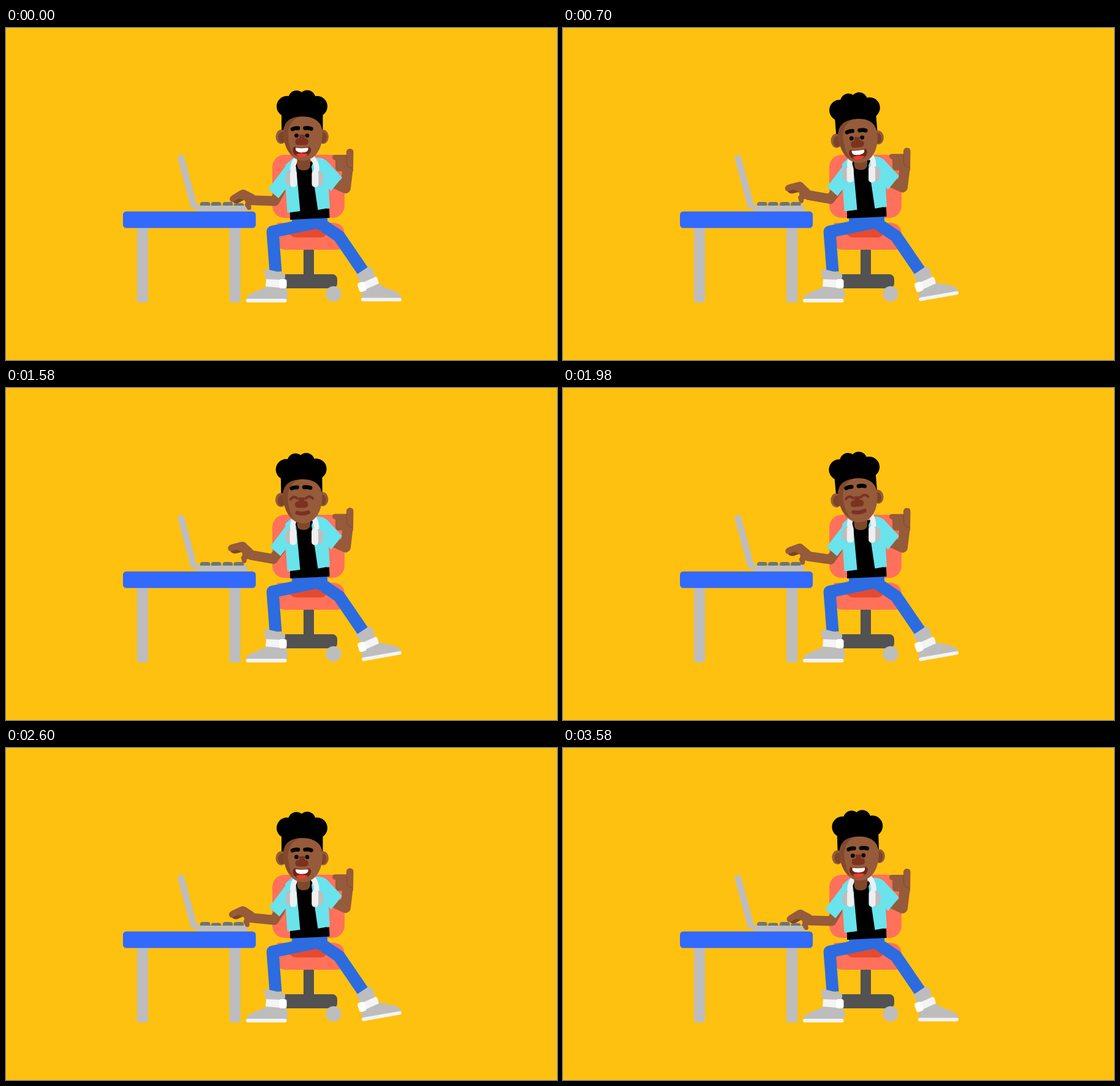
An HTML page that plays this animation: 900x542 px, repeating every 3.6 s.

```html
<!DOCTYPE html>
<html lang="en">
<head>
<meta charset="utf-8">
<title>Working at the desk</title>
<style>
html, body { margin: 0; width: 100%; height: 100%; overflow: hidden; background: #ffc110; }
svg { display: block; width: 100vw; height: 100vh; }
.blue { fill: none; stroke: #2c6ce0; stroke-width: 20; stroke-linejoin: round; }
.limb { fill: none; stroke: #965b3a; stroke-linejoin: round; stroke-linecap: round; }
.skin { fill: #965b3a; }
.ear { fill: #7c4529; }
.grey { fill: #bdbdbd; }
.white { fill: #f4f4f4; }
.coral { fill: #ff715b; }
.dark { fill: #525252; }
.cyan { fill: #6ae3ec; }
.deep { fill: #7b3320; }
</style>
</head>
<body>
<svg viewBox="0 0 900 542" preserveAspectRatio="none">
  <rect width="900" height="542" fill="#ffc110"/>

  <g id="chair">
    <rect class="dark" x="486" y="358" width="17" height="48"/>
    <rect class="dark" x="446" y="402" width="95" height="23" rx="8"/>
    <circle class="grey" cx="535" cy="434" r="12.6"/>
    <rect class="coral" x="435" y="207" width="118" height="103" rx="20"/>
    <path class="coral" d="M443 318H533Q553 318 553 338V350Q553 362 541 362H457Q443 362 443 348Z"/>
    <path d="M462 334L510 324L524 333Q522 342 513 342H474Q465 341 462 334Z" fill="#e64a2e"/>
  </g>

  <g id="legs">
    <path class="blue" d="M510 317L544 340L583 397"/>
    <path class="blue" d="M512 316.500L435.500 332.500L440.500 398"/>
    <path d="M467 308H525V319L508 326H467Z" fill="#2c6ce0"/>
  </g>

  <g id="leftShoe">
    <path class="grey" d="M422 398Q422 393 427 394L452 400Q457 401 456 406L454 416H425Z"/>
    <path class="grey" d="M392 443C394 432 413 430 425 422L457 424Q462 434 459 443Z"/>
    <path class="white" d="M425 410L449 411V424L424 422Z"/>
    <rect x="446" y="410" width="12.500" height="15" rx="3.500" fill="#fff"/>
    <rect class="white" x="392" y="442" width="66.500" height="6" rx="3"/>
  </g>

  <g id="rightShoe">
    <path class="grey" d="M572 403L590 391Q594 388 597 391L600 396L603 410L581 419Z"/>
    <g id="foot">
      <path class="grey" d="M580 442Q581 432 587 424L609 417C620 428 645 427 646 442Z"/>
      <rect class="white" x="580" y="440.500" width="66" height="5.800" rx="2.800"/>
    </g>
    <path class="white" d="M584 415L604 406Q607 406 609 417L587 427Z"/>
    <rect x="575.500" y="415" width="12" height="15.500" rx="3.500" fill="#fff" transform="rotate(-17 581 423)"/>
  </g>

  <g id="desk">
    <path class="grey" d="M214 320H232V445Q232 448 229 448H217Q214 448 214 445ZM365 320H383V445Q383 448 380 448H368Q365 448 365 445Z"/>
    <rect x="191" y="299.500" width="217" height="27" rx="5.500" fill="#3269ff"/>
    <g id="keys"></g>
    <path d="M286 212.500L306.500 289.500" fill="none" stroke="#bdbdbd" stroke-width="11" stroke-linecap="round"/>
    <path class="grey" d="M303 290H392Q396 290 395 294Q394 299 390 299H316Q311 299 308 294Z"/>
  </g>

  <g id="rightArm">
    <path class="limb" stroke-width="17" d="M532 251L554.500 261.500L558.500 228"/>
    <path class="skin" d="M538 207H556V202Q557 197 562 197Q567.500 197 567.500 203L567 234H544Q538 234 538 228V216Q533 215 533 211Q533 207 538 207Z"/>
    <path d="M556.500 208V218Q556 228 566 229" fill="none" stroke="#7f472b" stroke-width="1"/>
  </g>

  <g id="leftArm">
    <path class="limb" stroke-width="16" d="M448 266L439 282.500L403 281.500"/>
    <g id="hand">
      <path d="M370 284Q374 288 380 286L392 279L384 274Z" fill="#7c4529"/>
      <path class="skin" d="M366 282Q364 278 369 274L382 266Q388 262 393 266L405 272Q410 276 408 285L400 290L401 294Q400 298 395 297L390 289Q394 282 386 280L380 279L372 284Q368 286 366 282Z"/>
    </g>
  </g>

  <g id="torso">
    <path d="M470 218H503L524 295H528L528.500 310L464 313V301L477 299Z"/>
    <path class="cyan" d="M468 213L474 228L480.500 299L459.500 301.500L456 250L456 224Z"/>
    <path class="cyan" d="M505 212L499 226L509.500 297L529 293.500L527 262L531 266L549 244L524 217Q517 211 505 212Z"/>
    <path id="sleeve" class="cyan" d="M469 213Q462 217 457 225L428 263L445 278L459 260L468 235Z"/>
  </g>

  <g id="phones">
    <path d="M470 240C465 224 474 207 488 207S511 224 506 240" fill="none" stroke="#efefef" stroke-width="8.500"/>
    <rect class="grey" x="456.500" y="234" width="15" height="24" rx="8"/>
    <rect class="grey" x="504" y="234" width="15" height="24" rx="8"/>
    <rect x="464" y="233" width="11" height="27" rx="5" fill="#efefef"/>
    <rect x="499.500" y="233" width="11" height="27" rx="5" fill="#efefef"/>
  </g>

  <path id="neck" d="M475.500 205H497V222Q497 232.500 486 232.500T475.500 222Z" fill="#7f482b"/>

  <g id="head">
    <g id="hair">
      <path d="M450 125L470 112H498L517.500 125V172H450Z"/>
      <circle cx="459" cy="128" r="17"/><circle cx="474.500" cy="115.500" r="13.500"/>
      <circle cx="492" cy="115" r="13.500"/><circle cx="508" cy="128" r="17"/>
    </g>
    <ellipse class="skin" cx="449.500" cy="177.500" rx="9" ry="11.500"/>
    <ellipse class="ear" cx="451" cy="178.500" rx="6.500" ry="9"/>
    <ellipse class="skin" cx="518" cy="177.500" rx="9" ry="11.500"/>
    <ellipse class="ear" cx="517" cy="178.500" rx="6.500" ry="9"/>
    <path class="skin" d="M453 170C454 152 467 144.500 485 144.500S516 153 517 170C518 196 505 216.500 485.500 216.500S453 196 453 170Z"/>
    <path d="M453 170C454 152 465 145.500 480 145C464 150 460 165 461 178C462 192 465 200 470 209C459 201 453 187 453 170Z" fill="#82492d"/>
    <g id="brows" fill="none" stroke="#000" stroke-width="6.500" stroke-linecap="round">
      <path d="M468 165Q472 163 477 163.500M488.500 163.500Q494 162.500 498.500 164.500"/>
    </g>
    <path class="deep" d="M479 174H488V180Q494 180 494 185.500T487 191H478Q472.500 191 472.500 185.500T479 180Z"/>
    <g id="talk">
      <circle cx="474.500" cy="175.500" r="3.400"/><circle cx="492" cy="175.500" r="3.400"/>
      <path d="M471 194Q483 197 495 194Q499 196 498 201Q496 210 483 210T468.500 201Q468 195 471 194Z" fill="#6f2419"/>
      <path d="M474 206Q483 203.500 493 206Q490 211 483 211T474 206Z" fill="#ee3a35"/>
      <path d="M473 195.500Q483 197 493.500 195.500Q495 203 483.500 203.300T473 195.500Z" fill="#fff"/>
    </g>
    <g id="smile" fill="none" stroke="#7b3028" stroke-linecap="round">
      <path stroke-width="4" d="M465.500 177Q470.500 170 477 176M490 176Q496.500 169.500 502 176"/>
      <path stroke-width="6.500" d="M476 199Q485 202 494 198.500"/>
    </g>
  </g>
</svg>
<script>
const LOOP = 3600, BEAT = 1200;
const $ = id => document.getElementById(id);
const part = Object.fromEntries(
  ['foot', 'rightArm', 'leftArm', 'hand', 'torso', 'sleeve', 'phones', 'neck', 'head', 'brows', 'talk', 'smile', 'keys']
    .map(id => [id, $(id)]));

const keys = [317, 335, 354, 372].map(x => {
  const key = document.createElementNS('http://www.w3.org/2000/svg', 'rect');
  const attrs = { x, y: 284, width: 16.5, height: 9, rx: 4, fill: '#6f7474' };
  for (const name in attrs) key.setAttribute(name, attrs[name]);
  part.keys.append(key);
  return key;
});

const move = (el, value) => el.setAttribute('transform', value);
const show = (el, on) => el.setAttribute('visibility', on ? 'visible' : 'hidden');
const smooth = (a, b, x) => {
  const k = Math.min(1, Math.max(0, (x - a) / (b - a)));
  return k * k * (3 - 2 * k);
};
const bump = (t, mid, half) => Math.max(0, 1 - Math.abs(t - mid) / half);

function draw(t) {
  const p = t % BEAT / BEAT;
  const wave = peak => Math.cos(2 * Math.PI * (p - peak));

  const lift = smooth(0, .15, p) * (1 - smooth(.8, .98, p));
  move(part.foot, `translate(${1.5 * lift} ${-.5 * lift}) rotate(${-10 * lift} 583 446)`);
  move(part.torso, `translate(0 ${-2.2 * lift})`);

  const arm = .5 - .5 * wave(.95);
  move(part.leftArm, `translate(${-3 * arm} ${-4 * arm}) rotate(${10 * arm} 439 282)`);
  move(part.hand, `translate(${-4 * arm * arm} 0) rotate(${3 * arm + 8 * arm * arm} 404 282)`);
  move(part.sleeve, `translate(${4 * arm} ${-2 * arm})`);
  move(part.rightArm, `translate(0 ${-1.8 * arm})`);

  move(part.phones, `translate(${-.5 * arm} ${4 * wave(.08) - 3.8})`);

  const tilt = t < 220 ? 0 : 2.6 * (wave(.183) - 1);
  const drop = 2.4 - 2.7 * wave(.917);
  move(part.head, `translate(0 ${drop}) rotate(${tilt} 485 215)`);
  move(part.neck, `translate(0 ${-.8 * arm})`);

  const happy = t >= 960 && t < 2290;
  show(part.talk, !happy);
  show(part.smile, happy);
  move(part.brows, `translate(${happy ? -.5 : 0} ${happy ? -6 : 0})`);

  const press = [0, 1.5 * bump(t, 2600, 110) + 3 * bump(t, 3560, 40), 0, 2 * (1 - smooth(0, .3, arm))];
  keys.forEach((key, i) => move(key, `translate(0 ${press[i]})`));
}

const start = performance.now();
function tick() {
  draw((performance.now() - start) % LOOP);
  requestAnimationFrame(tick);
}
draw(0);
requestAnimationFrame(tick);
</script>
</body>
</html>
```
